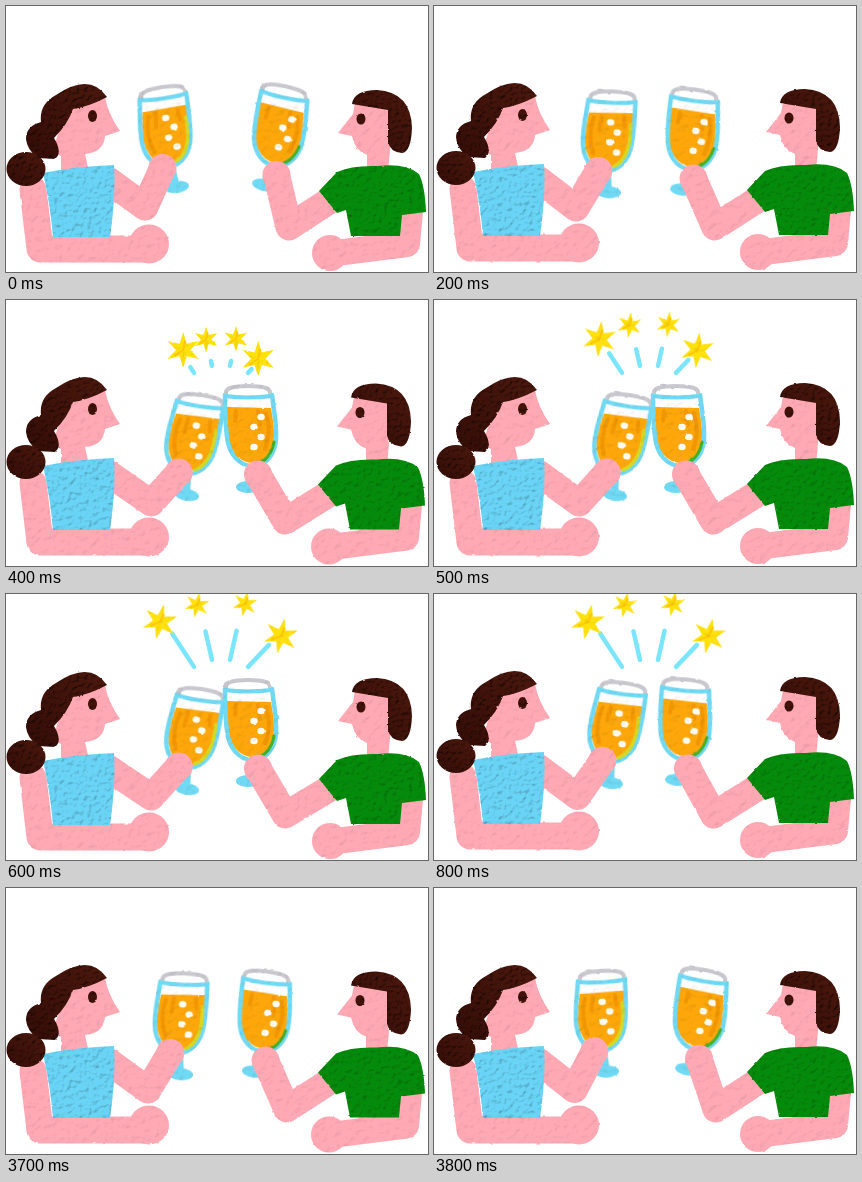
These frames come from a looping animation (422x266 px, 3.9 s). An HTML page:

```html
<!DOCTYPE html>
<html lang="en">
<head>
<meta charset="utf-8">
<title>Cheers</title>
<style>
  html, body { margin: 0; width: 100%; height: 100%; overflow: hidden; background: #fff; }
  svg { display: block; width: 100vw; height: 100vh; }
</style>
</head>
<body>
<svg id="stage" viewBox="0 0 422 266"></svg>
<script>
const SKIN = '#ffa9b5', BLUE = '#70d9f4', DARK = '#43130a';
const BEAT = 100, HOLD_END = 3600, LOOP = 3900;
const CENTRE = { x: 215, y: 86 };

const mix = (a, b, t) => a + (b - a) * t;
const fill = (d, color) => `<path d="${d}" fill="${color}"/>`;
const line = (d, color, w, extra = '') =>
  `<path d="${d}" fill="none" stroke="${color}" stroke-width="${w}" stroke-linecap="round" stroke-linejoin="round" ${extra}/>`;
const oval = (x, y, rx, ry, color) => `<ellipse cx="${x}" cy="${y}" rx="${rx}" ry="${ry}" fill="${color}"/>`;
const paint = (kind, inner) => `<g data-paint="${kind}">${inner}</g>`;

// glass keys are [foot x, foot y, tilt]; elbow follows the hand by the share `lag`
const ACTORS = {
  woman: {
    side: 1, rest: [171, 181, -8.5], toast: [177, 189, 7.5], clink: [181, 195, 8.5],
    grip: [-11.5, -21], shoulder: [102, 174], elbow: [139, 201], lag: .38,
    shift: k => [k * (k - 1), -Math.min(k, 1)],
    skin: fill('M62 98L99 91Q102 108 114 125L99 130Q98 146 79 148L83 166H55V150L46 146Z', SKIN) +
      line('M27 184L34 243H143', SKIN, 27) + oval(143, 238, 20, 19.5, SKIN),
    shirt: fill('M37 167Q72 160 108 159Q110 190 104 231H47Q44 196 37 167Z', '#6ad4f6'),
    hair: fill('M101 91Q84 66 50 89Q33 98 35 116Q20 120 20 133Q21 144 32 152L49 153Q57 147 48 132Q62 118 67 103Q82 101 101 91Z', 'url(#hair)') +
      oval(20, 163, 19.5, 17, 'url(#hair)') + oval(86.5, 110, 4.5, 6, DARK)
  },
  man: {
    side: -1, rest: [258, 179, 12.5], toast: [243, 186, 5], clink: [242, 187, 0],
    grip: [10, -12.5], shoulder: [326, 193], elbow: [283, 221], lag: .2,
    shift: k => [k * (k - 2), -k / 2],
    skin: fill('M349 97L347 108L332 127L346 130Q349 145 361 149V166H382L388 100Z', SKIN) +
      line('M404 205L401 238L330 247', SKIN, 26) + oval(324, 247, 18, 18, SKIN),
    shirt: fill('M313 185L331 166Q346 159 372 160Q400 157 413 168Q419 180 420 206L396 209L394 230H345L340 204L331 207Z', '#058b0b'),
    hair: fill('M346 98Q348 84 371 84Q405 86 406 122Q405 146 396 147Q384 146 382 136V104Z', 'url(#hair)') +
      oval(355, 113, 4.5, 5.5, DARK)
  }
};

// where the four stars end up: x, y, radius
const STARS = [[154, 28, 18], [191, 11, 13], [239, 10, 13], [275, 42, 18]];

function paintFilter(id, seed, freq, bump) {
  return `<filter id="${id}" color-interpolation-filters="sRGB" x="-40%" y="-40%" width="180%" height="180%">
    <feTurbulence type="fractalNoise" baseFrequency="${freq}" numOctaves="2" seed="${seed}" result="n"/>
    <feDisplacementMap in="SourceGraphic" in2="n" scale="2" xChannelSelector="R" yChannelSelector="G" result="s"/>
    <feDiffuseLighting in="n" surfaceScale="${bump}" diffuseConstant="1.16" lighting-color="#fff" result="l">
      <feDistantLight azimuth="235" elevation="60"/></feDiffuseLighting>
    <feComposite in="s" in2="l" operator="arithmetic" k1="1"/>
  </filter>`;
}

// drawn upright with its foot at 0,0
function glass(side) {
  const bowl = 'M-24 -92C-26 -75 -29 -62 -28 -48C-27 -33 -18 -21 -5 -21C9 -21 19 -33 21 -50C23 -65 23 -80 23 -92';
  const shine = side > 0
    ? line('M19 -68C20 -45 14 -31 4 -26', '#d6d822', 3.5)
    : line('M-26 -45C-24 -33 -17 -25 -8 -23', '#45b02c', 3);
  let bubbles = '';
  for (let i = 0; i < 4; i++)
    bubbles += oval((side > 0 ? -1 : -13) + i % 2 * 7, -70 + 10 * i, 3.7, 3.2, '#fffdf2');
  return `<g transform="scale(${side} 1)">
    ${oval(0, 0, 12, 6, BLUE)}${line('M-3 -20L-1 -2', BLUE, 8)}
    ${fill(bowl, '#fff')}
    ${fill('M-23 -79C-26 -62 -27 -50 -25 -43Q-19 -24 -5 -24C8 -24 18 -36 20 -50Q22 -66 21 -80Z', '#fda70a')}
    ${line('M-18 -74Q-24 -55 -17 -38M-10 -76L-12 -62M12 -76L13 -66', '#ee9100', 4, 'opacity=".7"')}
    ${line(bowl, BLUE, 4.5)}${shine}
    ${line('M-22 -94Q-23 -101 0 -101T22 -94', '#c9c8ce', 4)}
    ${line('M-23 -91Q0 -88 23 -91', BLUE, 4)}${bubbles}</g>`;
}

function star([, , r]) {
  let d = '';
  for (let k = 0; k < 12; k++) {
    const a = k * Math.PI / 6, q = k % 2 ? r * .4 : r;
    d += `${k ? 'L' : 'M'}${(q * Math.sin(a)).toFixed(1)} ${(-q * Math.cos(a)).toFixed(1)}`;
  }
  return `<g class="star">${paint('soft', fill(d + 'Z', '#ffe10c') +
    line(`M0 0L${-r * .45} ${r * .3}M0 0L${r * .1} ${-r * .5}`, '#ffc60a', 2))}</g>`;
}

const draw = ([name, a]) => `<g id="${name}">
  <g class="body">${paint('soft', a.skin)}</g>
  <g class="glass">${paint('soft', glass(a.side))}</g>
  ${paint('soft', line('', SKIN, 27, 'class="arm"') + `<circle class="hand" r="14" fill="${SKIN}"/>`)}
  <g class="body">${paint('cloth', a.shirt)}${paint('hair', a.hair)}</g></g>`;

const kinds = { soft: [.15, .4], cloth: [.2, .9], hair: [.25, 2] };
const filters = Object.entries(kinds).flatMap(([kind, look]) =>
  [0, 1, 2].map(k => paintFilter(kind + k, 4 + 7 * k, ...look))).join('');

const stage = document.getElementById('stage');
stage.innerHTML = `<defs>${filters}
  <linearGradient id="hair" x1="1" y1="0" x2="0" y2="1"><stop stop-color="#4c180d"/><stop offset="1" stop-color="#340d07"/></linearGradient></defs>
  ${Object.entries(ACTORS).map(draw).join('')}
  <g id="burst">${STARS.map(() => line('', '#7be6fb', 4.5, 'class="ray"')).join('')}${STARS.map(star).join('')}</g>`;

const all = sel => [...stage.querySelectorAll(sel)];
const painted = all('[data-paint]'), stars = all('.star'), rays = all('.ray');
const burst = stage.querySelector('#burst');

// reach: 0 at rest, 3 toast, 4 clink
function pose(name, reach, drawing) {
  const a = ACTORS[name], part = c => stage.querySelector(`#${name} .${c}`);
  const [x, y, tilt] = reach > 3 ? a.clink : a.rest.map((v, i) => mix(v, a.toast[i], reach / 3));
  const place = (px, py, deg) => {
    const r = deg * Math.PI / 180, c = Math.cos(r), s = Math.sin(r);
    return [px + a.grip[0] * c - a.grip[1] * s, py + a.grip[0] * s + a.grip[1] * c];
  };
  const [hx, hy] = place(x, y, tilt), [restX] = place(...a.rest);
  const [dx, dy] = a.shift(drawing);
  const ex = a.elbow[0] + (hx - restX) * a.lag, ey = a.elbow[1] + reach / 2 * (a.side > 0);
  all(`#${name} .body`).forEach(b => b.setAttribute('transform', `translate(${dx} ${dy})`));
  part('glass').setAttribute('transform', `translate(${x} ${y}) rotate(${tilt})`);
  part('arm').setAttribute('d', `M${a.shoulder[0] + dx} ${a.shoulder[1] + dy}L${ex} ${ey}L${hx} ${hy}`);
  part('hand').setAttribute('cx', hx);
  part('hand').setAttribute('cy', hy);
}

function spread(t) {
  STARS.forEach(([x, y], i) => {
    const q = i - 1.5, dx = x - CENTRE.x, dy = y - CENTRE.y, far = mix(.62, 1, t);
    stars[i].setAttribute('transform',
      `translate(${CENTRE.x + dx * far} ${CENTRE.y + dy * far}) rotate(${12 * t})`);
    const ix = CENTRE.x + 18 * q, iy = 65 + 3.5 * q * q, k = .63 + .075 * q * q, grow = mix(.17, 1, t);
    rays[i].setAttribute('d',
      `M${ix} ${iy}L${mix(ix, CENTRE.x + dx * k, grow)} ${mix(iy, CENTRE.y + dy * k, grow)}`);
  });
}

function show(beat) {
  const reach = beat < 7 ? Math.min(beat, 4) : Math.min(3, 12 - beat);
  const drawing = beat % 3;
  Object.keys(ACTORS).forEach(name => pose(name, reach, drawing));
  painted.forEach(g => g.setAttribute('filter', `url(#${g.dataset.paint}${drawing})`));
  burst.style.display = beat >= 4 && beat <= 8 ? '' : 'none';
  spread(Math.max(0, Math.min(1, (beat - 4) / 2)));
}

let current = -1;
const start = performance.now();
function tick() {
  const t = (performance.now() - start) % LOOP;
  const beat = t < HOLD_END ? Math.min(8, Math.floor(t / BEAT)) : 9 + Math.floor((t - HOLD_END) / BEAT);
  if (beat !== current) show(current = beat);
  requestAnimationFrame(tick);
}
tick();
</script>
</body>
</html>
```
